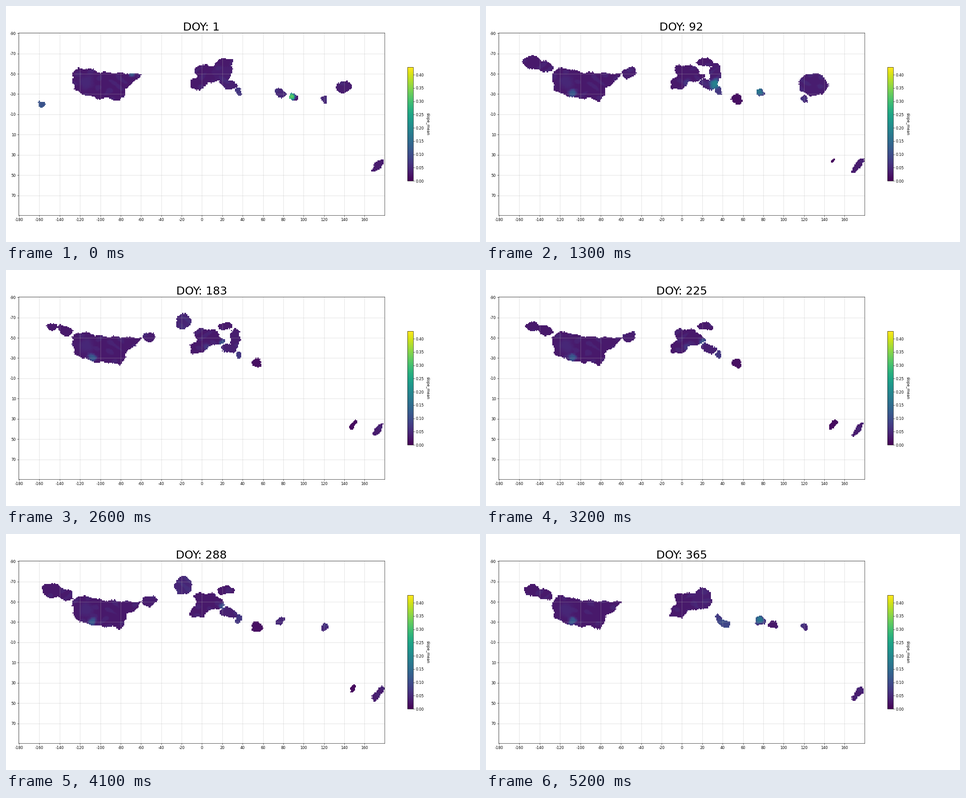
These frames come from a looping animation (1058x529 px, 5300 ms). A matplotlib script:

```python
import numpy as np
import matplotlib.pyplot as plt
from matplotlib.animation import FuncAnimation
from matplotlib.path import Path

W, H, DPI = 1058, 529, 64
PT = 60 / DPI                  # lengths below are points at 60 dpi
N_WEEKS = 53
VMAX = 0.4286
ALWAYS = [(0, N_WEEKS)]

lon, lat = np.meshgrid(np.arange(-180, 180), np.arange(-90, 90))

# the two land masses that stay covered all year
WEST = Path([(-126, -35), (-128, -50), (-122, -56), (-110, -55), (-102, -52),
             (-85, -51), (-59, -50), (-66, -42), (-74, -37), (-77, -27), (-81, -23),
             (-91, -26), (-102, -25.5), (-118, -30)])
EUROPE = Path([(-12, -37), (-11, -44), (-5, -47), (-8, -56), (-3, -59), (12, -58),
               (20, -52), (23, -46), (15, -43), (6, -41), (0, -34.5), (-10, -35)])


def smooth(t):
    t = np.clip(t, 0, 1)
    return t * t * (3 - 2 * t)


def patch(at, size, spans=ALWAYS, value=.03, tilt=0, to=None, swing=.08, peak=8,
          period=36):
    """Ellipse that drifts from `at` to `to` over its first span and breathes."""
    first, last = spans[0]

    def draw(field, x, y, week):
        if not any(a <= week <= b for a, b in spans):
            return
        t = smooth((week - first) / (last - first)) if to else 0
        cx, cy = np.array(at) * (1 - t) + np.array(to or at) * t
        scale = 1 + swing * np.cos(2 * np.pi * (week - peak) / period)
        c, s = np.cos(np.radians(tilt)), np.sin(np.radians(tilt))
        dx, dy = x - cx, y - cy
        u, v = (c * dx + s * dy) / size[0], (c * dy - s * dx) / size[1]
        field[np.hypot(u, v) < scale] = value

    return draw


def glow(at, radius, value, spans=ALWAYS):
    """Spot that pulls the covered cells around it towards a value."""
    def draw(field, x, y, week):
        if any(a <= week <= b for a, b in spans):
            d = np.hypot(x - at[0], y - at[1]) / radius
            field += (value - field) * np.exp(-d ** 4)

    return draw


PATCHES = [
    # northern and western fringes
    patch((-147, -61), (8, 5.5), [(2, 52)], tilt=12, swing=.35),
    patch((-135, -57.5), (8.5, 5), [(2, 52)], tilt=25),
    patch((-52, -51), (7, 5), [(8, 46)], .035, tilt=-15),
    patch((-158, -20.5), (3.2, 3.2), [(0, 9)], .11),
    patch((-18.5, -66), (8, 8.5), [(17, 26), (37, 46)], .045),
    # eastern Europe down to the Levant
    patch((20, -53), (9.5, 10.5), [(0, 2), (47, 52)], .036),
    patch((23, -61.5), (8, 4), [(0, 46)]),
    patch((32.5, -50), (5.5, 10.5), [(3, 26)], .035),
    patch((26, -39.5), (8.5, 4.5), [(0, 46)], .04, tilt=15),
    patch((20.5, -52.5), (3, 3.5), [(3, 26)], np.nan),
    patch((36, -33), (3, 4), value=.07),
    patch((41, -29), (7.5, 3.5), [(47, 52)], .09, tilt=20),
    # southern and eastern Asia
    patch((54, -25), (5, 5), [(3, 16), (26, 46)], .018),
    patch((77, -31), (4, 3.6), [(0, 23), (37, 52)], .05, swing=.3, peak=0, period=52),
    patch((90, -27), (5, 3.5), [(0, 9), (47, 52)], .03, tilt=25),
    patch((120.5, -25), (3, 3.8), [(0, 16), (37, 52)], .05),
    patch((139.5, -37), (11, 8.5), [(0, 23)], .035, to=(122, -41),
          swing=.3, peak=13, period=26),
    # far south
    patch((148.5, 36), (3.5, 1.8), [(3, 46)], .012, tilt=-55,
          swing=.6, peak=32, period=52),
    patch((173, 40.5), (8, 3.2), value=.032, tilt=-50),
]
GLOWS = [
    glow((-114, -42), 7, .048),
    glow((-108, -31), 4, .12, [(3, 52)]),
    glow((-69, -50), 3, .13, [(0, 2)]),
    glow((5, -41), 4, .07, [(9, 37)]),
    glow((20, -46), 3, .11, [(17, 45)]),
    glow((32, -40), 5, .19, [(9, 16)]),
    glow((76, -32), 4, .17, [(2, 16), (47, 52)]),
    glow((88, -27), 3.5, .32, [(0, 9)]),
]


def field_at(week):
    # sway and roughen the coordinates so every coast is ragged and shifts weekly
    rng = np.random.default_rng(week)
    x = lon + .6 * np.sin(.7 * lat + week) + rng.uniform(-.4, .4, lon.shape)
    y = lat + .7 * np.sin(.45 * lon + 1.3 * week) + rng.uniform(-.4, .4, lat.shape)
    field = np.full(lon.shape, np.nan)
    cells = np.c_[x.ravel(), y.ravel()]
    for land in (WEST, EUROPE):
        field[land.contains_points(cells).reshape(lon.shape)] = .03
    for draw in PATCHES:
        draw(field, x, y, week)

    mottle = (np.sin(.31 * lon + 1.7 * np.sin(.23 * lat) + .11 * week)
              * np.sin(.37 * lat + 1.3 * np.sin(.19 * lon) - .07 * week))
    field += np.where(field > .02, .012 * smooth(3 * mottle - 1), 0)
    for draw in GLOWS:
        draw(field, x, y, week)
    return field


plt.rcParams.update({
    "font.family": "DejaVu Sans", "font.size": 10 * PT,
    "axes.linewidth": .8 * PT, "axes.titlepad": 6 * PT,
    "grid.linewidth": .8 * PT, "grid.alpha": .55,
    **{f"{axis}tick.major.{key}": size * PT for axis in "xy"
       for key, size in (("size", 3.5), ("pad", 3.5), ("width", .8))}})


def pixel_axes(left, top, right, bottom):
    return fig.add_axes([left / W, 1 - bottom / H, (right - left) / W, (bottom - top) / H])


fig = plt.figure(figsize=(W / DPI, H / DPI), dpi=DPI, facecolor="white")
ax = pixel_axes(27.95, 60, 844.7, 469)
image = ax.imshow(field_at(0), cmap="viridis", vmin=0, vmax=VMAX,
                  extent=(-180.5, 179.5, 89.5, -90.5), aspect="auto",
                  interpolation="nearest")
xticks, yticks = range(-180, 180, 20), range(-90, 90, 20)
ax.set_xticks(xticks, [str(v) for v in xticks])
ax.set_yticks(yticks, [str(v) for v in yticks])
ax.grid(True)
title = ax.set_title("DOY: 1", fontsize=30 * PT)

bar = fig.colorbar(image, cax=pixel_axes(896, 137, 909, 392), ticks=np.arange(9) * .05)
bar.ax.set_yticklabels([f"{v * .05:.2f}" for v in range(9)])
fig.text(941 / W, 1 - 264.5 / H, "slope_mean", rotation=270, ha="center", va="center")


def update(week):
    image.set_data(field_at(week))
    title.set_text(f"DOY: {1 + 7 * week}")
    return image, title


anim = FuncAnimation(fig, update, frames=N_WEEKS, interval=100, repeat=True,
                     repeat_delay=0)
plt.show()
```
